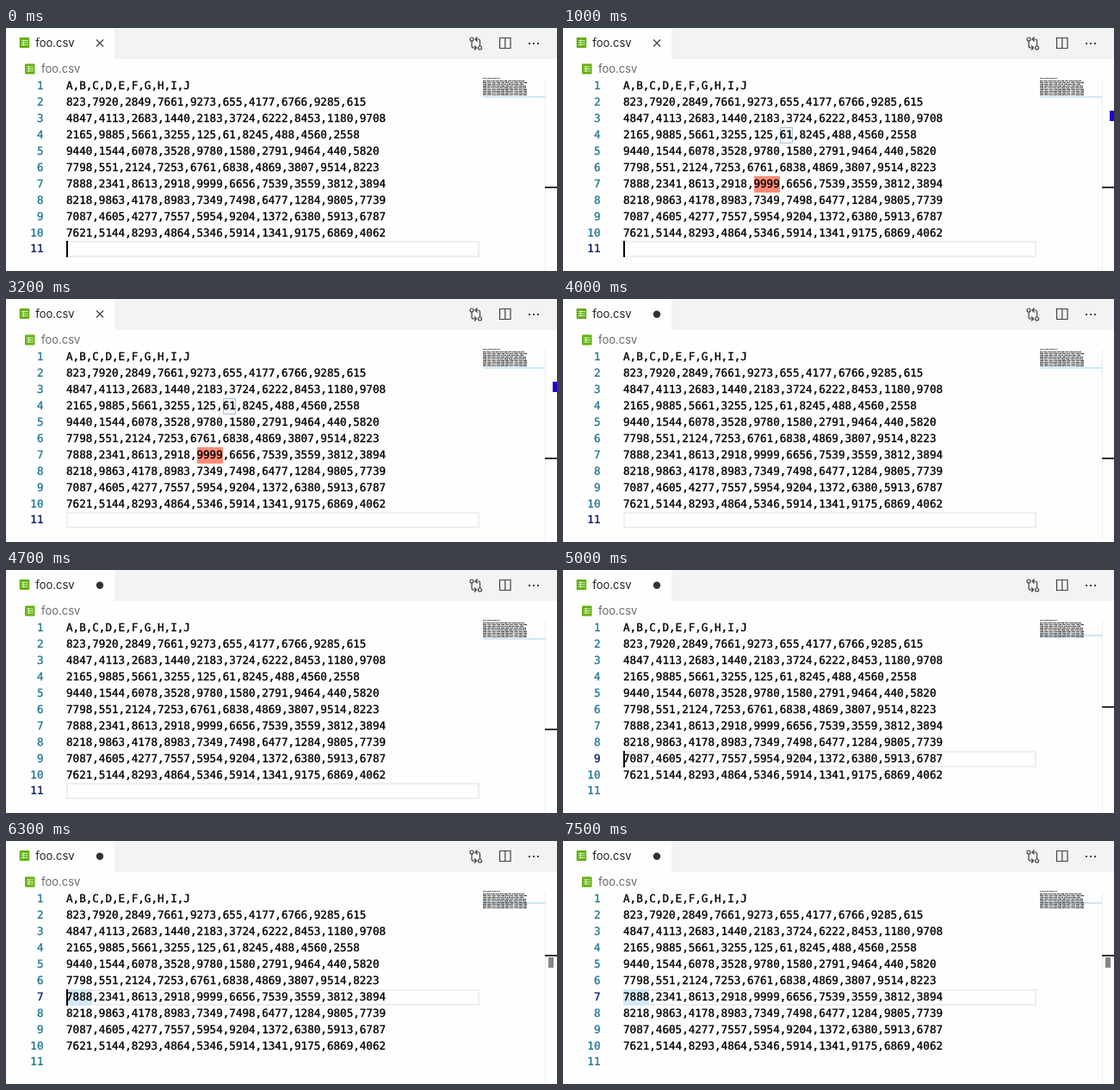
Write an HTML page that moves like this. It is 640 px wide and 282 px high and loops after 8000 ms.

```html
<!DOCTYPE html>
<html lang="en">
<head>
<meta charset="utf-8">
<title>foo.csv</title>
<style>
  html, body { margin: 0; width: 100%; height: 100%; overflow: hidden; background: #fefefe; }
  body * { position: absolute; box-sizing: border-box; }
  svg { left: 0; top: 0; }
  svg text { font: 13px Inter, sans-serif; }
  .stroke { fill: none; stroke: #424242; stroke-width: 1.2; }

  pre { margin: 0; top: 58.4px; font: 12.58px/18.9px "DejaVu Sans Mono", monospace;
        text-rendering: geometricPrecision; -webkit-text-stroke: .35px; }
  #code { left: 70px; color: #000; }
  #nums { right: calc(100% - 43.5px); text-align: right; color: #237893; }
  #nums span { position: static; }
  #map { left: 554px; top: 58px; transform: scale(.1375, .111); transform-origin: 0 0;
         color: #222; -webkit-text-stroke: 2px #333; }

  .cell { height: 19px; }
  #line { left: 70px; width: 480px; border: 2px solid #eee; }
  #word { left: 70px; background: #d3e9f5; }
  #min { border: 1.5px solid #a9c3d6; background: #f2f6f8; }
  #max { background: #ff8b78; }
  #caret { width: 2px; background: #000; }

  #mapLine { left: 554px; width: 72px; height: 2px; background: #cfe7f8; }
  #ruler { left: 626px; top: 58px; width: 1px; height: 224px; background: #ececf2; }
  #rulerCaret { left: 626px; width: 14px; height: 2px; background: #333; }
  .block { width: 5.5px; height: 12px; }
  #rulerWord { left: 630px; background: #858585; }
  #rulerMin { left: 635px; background: #2100d0; }
</style>
</head>
<body>
<svg width="640" height="282">
  <defs>
    <g id="icon">
      <rect width="11.5" height="12" rx="1" fill="#62b010"/>
      <path d="M2 3.5h8M2 6h8M2 8.5h8M4.7 2.5v7" stroke="#f2ffe4" stroke-width=".8"/>
    </g>
  </defs>
  <rect x="126" width="514" height="36" fill="#f3f3f3"/>
  <use href="#icon" x="15.7" y="11"/>
  <text x="34.3" y="21.5" fill="#222">foo.csv</text>
  <path id="close" class="stroke" d="M105 13.5l8 8m0-8l-8 8"/>
  <circle id="dirty" cx="109" cy="17.7" r="4.2" fill="#333"/>
  <use href="#icon" x="22" y="41.5"/>
  <text x="41" y="52" fill="#6a6a6a">foo.csv</text>
  <g class="stroke">
    <circle cx="541" cy="13" r="2"/>
    <circle cx="550.5" cy="23" r="2"/>
    <path id="arrow" d="M541 15v6q0 2 2 2h3m-2-2.5l2.5 2.5l-2.5 2.5"/>
    <use href="#arrow" transform="rotate(180 545.75 18)"/>
    <path d="M573.5 11.5h12.5v12h-12.5zM579.8 11.5v12"/>
    <path d="M607 18h12" stroke-width="2.2" stroke-dasharray="2 3"/>
  </g>
</svg>

<div id="line" class="cell"></div>
<div id="word" class="cell"></div>
<div id="min" class="cell"></div>
<div id="max" class="cell"></div>
<pre id="nums"></pre>
<pre id="code">A,B,C,D,E,F,G,H,I,J
823,7920,2849,7661,9273,655,4177,6766,9285,615
4847,4113,2683,1440,2183,3724,6222,8453,1180,9708
2165,9885,5661,3255,125,61,8245,488,4560,2558
9440,1544,6078,3528,9780,1580,2791,9464,440,5820
7798,551,2124,7253,6761,6838,4869,3807,9514,8223
7888,2341,8613,2918,9999,6656,7539,3559,3812,3894
8218,9863,4178,8983,7349,7498,6477,1284,9805,7739
7087,4605,4277,7557,5954,9204,1372,6380,5913,6787
7621,5144,8293,4864,5346,5914,1341,9175,6869,4062
</pre>
<div id="caret" class="cell"></div>
<div id="mapLine"></div>
<pre id="map"></pre>
<div id="ruler"></div>
<div id="rulerWord" class="block"></div>
<div id="rulerMin" class="block"></div>
<div id="rulerCaret"></div>

<script>
const LOOP = 8000, CHAR = 7.575, ROW = 18.9;
const EDIT = 3500, UNDO = 4200, UPS = [4800, 5000, 5200, 6000];

const $ = id => document.getElementById(id);
const show = (id, on) => $(id).style.visibility = on ? "visible" : "hidden";
const colX = col => 70 + col * CHAR;
const rowY = row => 58.4 + (row - 1) * ROW;
const rulerY = row => 42 + row * 13;
const setTop = (id, y) => $(id).style.top = y + "px";

const text = $("code").textContent, lines = text.split("\n");
$("map").textContent = text;
$("nums").innerHTML = lines.map((_, i) => `<span>${i + 1}</span>`).join("\n");
const nums = [...$("nums").children];

// Frame the smallest and largest value of the table
const values = text.match(/\d+/g).map(Number);
for (const id of ["min", "max"]) {
  const value = String(Math[id](...values));
  const i = lines.findIndex(s => s.split(",").includes(value));
  const col = `,${lines[i]},`.indexOf(`,${value},`);
  setTop(id, rowY(i + 1));
  $(id).style.left = colX(col) + "px";
  $(id).style.width = value.length * CHAR + "px";
  if (id === "min") setTop("rulerMin", rulerY(i + 1) + 2);
}
$("word").style.width = 4 * CHAR + "px";

function draw(t) {
  const row = lines.length - UPS.filter(k => k <= t).length;
  const col = t >= EDIT && t < UNDO ? 1 : 0;
  const age = t - ([EDIT, UNDO, ...UPS].findLast(k => k <= t) ?? -300);
  const edited = t >= EDIT, word = row < lines.length && age >= 300;

  show("close", !edited);
  show("dirty", edited);
  for (const id of ["min", "max", "rulerMin"]) show(id, t >= 900 && !edited);
  for (const id of ["word", "rulerWord"]) show(id, word);
  show("caret", age % 1000 < 500);

  $("caret").style.left = colX(col) + "px";
  for (const id of ["line", "word", "caret"]) setTop(id, rowY(row));
  setTop("mapLine", 58 + (row - 1) * 2.1);
  setTop("rulerCaret", rulerY(row) - 1);
  setTop("rulerWord", rulerY(row) + 2);
  nums.forEach((el, i) => el.style.color = i + 1 === row ? "#0b216f" : "");
}

function tick() {
  draw(performance.now() % LOOP);
  requestAnimationFrame(tick);
}
tick();
</script>
</body>
</html>
```
